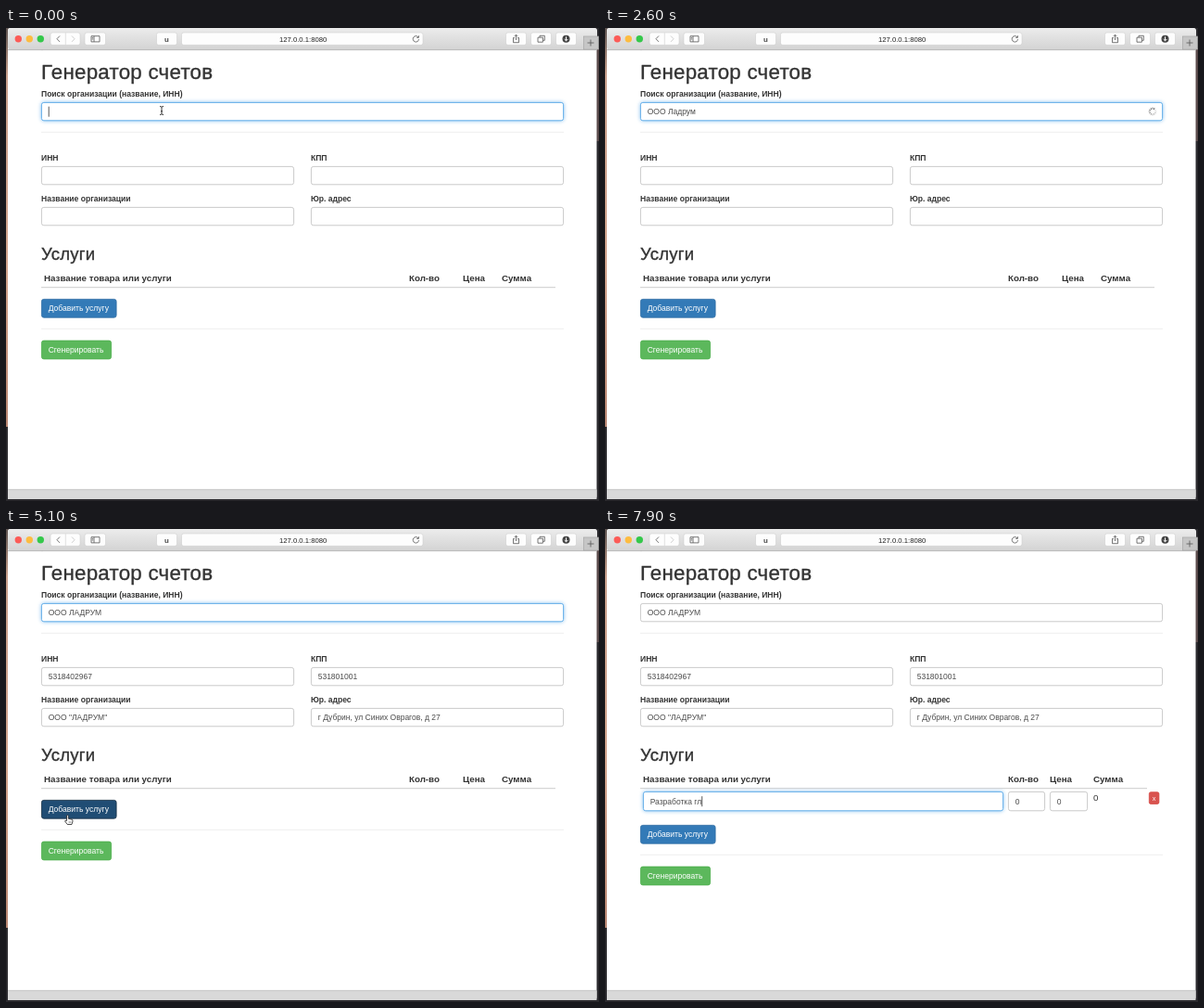
An HTML page that plays this animation: 640x510 px, repeating every 8 s.

```html
<!DOCTYPE html>
<html lang="ru">
<head>
<meta charset="utf-8">
<title>Генератор счетов</title>
<style>
html, body { margin: 0; width: 100%; height: 100%; overflow: hidden; }
svg { display: block; width: 640px; height: 510px; font-family: "Liberation Sans", Arial, sans-serif; }
text { white-space: pre; }
.title { stroke: #333; stroke-width: .35px; letter-spacing: .25px; }
.focus { stroke: #66afe9; filter: drop-shadow(0 0 2px rgba(102, 175, 233, .75)); }
.icon { fill: none; stroke: #555; stroke-width: .8; }
</style>
</head>
<body>
<svg viewBox="0 0 640 510">
  <defs>
    <linearGradient id="bar" x2="0" y2="1"><stop stop-color="#ececec"/><stop offset="1" stop-color="#d3d3d3"/></linearGradient>
    <linearGradient id="wall" x2="0" y2="1"><stop stop-color="#5d5350"/><stop offset=".12" stop-color="#c9a08c"/><stop offset=".6" stop-color="#d2a48d"/><stop offset="1" stop-color="#b98672"/></linearGradient>
  </defs>
  <g id="chrome"></g>
  <g id="page"></g>
</svg>
<script>
const LOOP = 8000;
const SHORT = 'ООО Ладрум', FULL = 'ООО ЛАДРУМ', INN = '5318402967';
const ADDRESS = 'г Дубрин, ул Синих Оврагов, д 27';
const SERVICE = 'Разработка гл';

// Blue parts of a suggestion are wrapped in asterisks.
const suggestions = [
  ['*ООО ЛАДРУМ*', INN, ADDRESS],
  ['*ООО Ладрум*', '5307619428', 'г Дубрин, ул Дымковая Б., д 34 стр 5'],
  ['*ООО ЛАДРУМ*.СЕРВИС', '5302846173', 'г Дубрин, Златокленовый пер, д 7, кв 8'],
  ['*ООО Ладрум*.Дороги', '5309274510', ADDRESS],
  ['*ООО* НКО "*Ладрум*.Монеты"', '5340016387', 'г Дубрин, ул Серого Камыша, д 18, кв 52']
];
const LIST_TOP = 115.3, ITEM = 28.75;

const searchKeys = [500, 600, 700, 800, 1000, 1100, 1200, 1300, 1400, 1500];
const serviceKeys = [6600, 6700, 6800, 7000, 7100, 7200, 7300, 7400, 7500, 7600, 7600, 7800, 7900];
const pointerPath = [
  [0, 168, 89], [2700, 168, 89], [3200, 134, 124], [3300, 134, 124], [3600, 128, 127.5],
  [3700, 128, 127.5], [4200, 185, 225], [4400, 185, 225], [5000, 67, 309],
  [5300, 67, 309], [5800, 109.5, 297], [LOOP, 109.5, 297]
];

const ctx = document.createElement('canvas').getContext('2d');
ctx.font = '8.5px "Liberation Sans", Arial, sans-serif';

const text = (x, y, s, size = 8.5, fill = '#333', extra = '') =>
  `<text x="${x}" y="${y}" font-size="${size}" fill="${fill}" ${extra}>${s}</text>`;
const bold = (x, y, s, size = 8.55) => text(x, y, s, size, '#333', 'font-weight="bold"');
const rect = (x, y, w, h, fill, r = 0, extra = '') =>
  `<rect x="${x}" y="${y}" width="${w}" height="${h}" rx="${r}" fill="${fill}" ${extra}/>`;
const path = (d, extra = 'class="icon"') => `<path d="${d}" ${extra}/>`;
const rule = (y, x2, color, width = 1) => path(`M38 ${y}H${x2}`, `stroke="${color}" stroke-width="${width}"`);

function field(x, y, w, value = '', { focus = false, caret = 0, h = 20 } = {}) {
  const base = y + h / 2 + 3.2, left = x + 7.7;
  const end = left + ctx.measureText(value).width + .5;
  return rect(x + .4, y + .4, w - .8, h - .6, '#fff', 2.4, focus ? 'class="focus"' : 'stroke="#c4c4c4" stroke-width=".9"')
    + text(left, base, value, 8.5, '#4c4c4c')
    + (caret ? path(`M${end} ${base - 8.5}v11`, `stroke="#444" stroke-width=".9" opacity="${caret}"`) : '');
}

function button(x, y, w, label, fill, stroke) {
  return rect(x + .4, y + .4, w - .8, 19.8, fill, 2.4, `stroke="${stroke}" stroke-width=".8"`)
    + text(x + 7.7, y + 13.2, label, 8.55, '#fff');
}

function chrome() {
  const pill = (x, w) => rect(x, 5, w, 13.3, '#fdfdfd', 2.2, 'stroke="#c9c9c9" stroke-width=".5"');
  const lights = ['#fc5b57', '#fdbc40', '#34c84a'].map((c, i) => `<circle cx="${13.3 + i * 12}" cy="11.8" r="3.7" fill="${c}"/>`);
  return rect(0, 0, 640, 510, '#2b2a2e') + rect(0, 0, 3, 430, 'url(#wall)')
    + rect(637, 22, 3, 100, '#5a4b4b') + rect(2, 0, 635.5, 508, '#fff', 3)
    + rect(2, 0, 636, 23.5, 'url(#bar)', 3) + rule(23.6, 637.5, '#b9b9b9') + path('M2 23.6H40', 'stroke="#b9b9b9"')
    + rect(623.5, 9, 16, 14, '#c6c6c6', 0, 'stroke="#a5a5a5" stroke-width=".7"') + path('M627.5 16h7M631 12.5v7')
    + rect(2, 498, 635.5, 10, '#d9d9d9') + path('M2 497.7H637.5', 'stroke="#b5b5b5" stroke-width=".8"')
    + lights.join('')
    + pill(48, 32) + path('M64.3 5v13.3', 'stroke="#d4d4d4" stroke-width=".7"')
    + path('M58 8.5l-3 3.2 3 3.2') + path('M71 8.5l3 3.2-3 3.2', 'class="icon" opacity=".35"')
    + pill(85, 22.5) + path('M92 8.7h9v6.2h-9zM95 8.7v6.2M92.8 10.4h1.4M92.8 12h1.4')
    + pill(162.5, 22) + text(173.5, 14.7, 'u', 7.8, '#444', 'text-anchor="middle" font-weight="bold"')
    + pill(189.5, 260.5) + text(295, 14.6, '127.0.0.1:8080', 7.7, '#222')
    + path('M444.9 9.8a3.2 3.2 0 1 0 .7 2.4M445.4 8.2v2.2h-2.2')
    + pill(539.5, 22) + path('M548.9 10.5h-1.4v5.2h6v-5.2h-1.4M550.5 13V7.3M548.7 9l1.8-1.8 1.8 1.8')
    + pill(566.5, 22) + path('M576 10V8.3h5.3v5h-1.7M574 10.2h5.4v5H574z')
    + pill(593.5, 22) + '<circle cx="604.5" cy="11.8" r="4" fill="#444"/>'
    + path('M604.5 9.3v4.4M602.6 12l1.9 1.9 1.9-1.9', 'fill="none" stroke="#fff"');
}

function spinner(t) {
  let s = '';
  for (let i = 0; i < 12; i++)
    s += `<path d="M0 -2.4V-4.4" transform="translate(591 90) rotate(${(i + t / 100) * 30})" stroke="#333" stroke-width=".9" opacity="${.15 + i * .06}"/>`;
  return s;
}

function suggestionList(y) {
  const hovered = Math.floor((y - LIST_TOP) / ITEM);
  const items = suggestions.map(([name, inn, address], i) => {
    const top = LIST_TOP + i * ITEM;
    const label = name.split('*').map((s, k) => `<tspan fill="${k % 2 ? '#248bea' : '#111'}">${s}</tspan>`).join('');
    const digits = inn.replace(/(..)(..)(.{5})(.)/, '$1<tspan dx="1.3">$2</tspan><tspan dx="1.3">$3</tspan><tspan dx="1.3">$4</tspan>');
    return (i === hovered ? rect(39, top, 562, ITEM, '#f4f4f5') : '')
      + text(41, top + 11.7, label) + text(41, top + 23.3, `${digits}  ${address}`, 8.5, '#666');
  });
  return rect(38.4, 100, 563, 159, '#fff', 0, 'stroke="#999" stroke-width=".8"')
    + text(41, 109.6, 'Выберите вариант или продолжите ввод', 7.3, '#707070') + items.join('');
}

function pointerAt(t) {
  const i = pointerPath.findIndex(p => p[0] > t);
  const [t0, x0, y0] = pointerPath[i - 1], [t1, x1, y1] = pointerPath[i];
  const k = (t - t0) / (t1 - t0), e = k * k * (3 - 2 * k);
  return [x0 + (x1 - x0) * e, y0 + (y1 - y0) * e];
}

function pointer(x, y, shape) {
  const shapes = {
    beam: path('M-2 -4.5Q0 -4.5 0 -3.5Q0 -4.5 2 -4.5M0 -3.5V3.5M-2 4.5Q0 4.5 0 3.5Q0 4.5 2 4.5M-1 .8H1', 'fill="none" stroke="#222" stroke-width=".9"'),
    arrow: path('M0 0V9.2L2.1 7.3 3.6 10.6 5.2 9.9 3.8 6.7H6.6Z', 'stroke="#fff" stroke-width=".7"'),
    hand: path('M-1.5 0Q-.5 -1.2 .3 0V3.3L4.2 4.2Q5.3 4.6 5 6L4 9.5H-.8L-3.4 6Q-3.5 4.6 -1.5 5.6Z', 'fill="#fff" stroke="#222" stroke-width=".8"')
      + path('M1.2 6.2V8M2.8 6.2V8', 'stroke="#333" stroke-width=".5"')
  };
  return `<g transform="translate(${x} ${y})">${shapes[shape]}</g>`;
}

const typed = (s, keys, t) => s.slice(0, keys.filter(k => k <= t).length);

function page(t) {
  const filled = t >= 3800, row = t >= 5300, editing = t >= 6000;
  const listOpen = t >= 2700 && !filled;
  const shift = row ? 27 : 0;
  const [x, y] = pointerAt(t);
  const pointerShown = t < 500 || (t >= 2800 && t < 6600);
  const overButton = x > 38 && x < 120 && y > 292 + shift && y < 312 + shift;
  const overField = (y > 80 && y < 100) || (row && x > 41 && x < 430 && y > 283 && y < 304);
  const pressed = overButton && t >= 5000;
  const searchCaret = t < 400 ? Math.max(0, 1 - t / 300) : +(t >= 500 && t < 1600);
  const [blue, blueEdge] = pressed ? ['#204d74', '#122b40'] : overButton ? ['#286090', '#204d74'] : ['#337ab7', '#2e6da4'];

  let s = text(38, 55, 'Генератор счетов', 22.3, '#333', 'class="title"')
    + bold(38, 74, 'Поиск организации (название, ИНН)')
    + field(38, 80, 564, filled ? FULL : typed(SHORT, searchKeys, t), { focus: !editing, caret: searchCaret })
    + rule(112.3, 602, '#eee')
    + bold(38, 143, 'ИНН') + field(38, 149, 273, filled ? INN : '')
    + bold(329, 143, 'КПП') + field(329, 149, 273, filled ? '531801001' : '')
    + bold(38, 187, 'Название организации') + field(38, 193, 273, filled ? 'ООО "ЛАДРУМ"' : '')
    + bold(329, 187, 'Юр. адрес') + field(329, 193, 273, filled ? ADDRESS : '')
    + text(38, 250.3, 'Услуги', 18.5, '#333', 'class="title"')
    + bold(41, 273.2, 'Название товара или услуги', 9.75) + bold(435, 273.2, 'Кол-во', 9.75)
    + bold(row ? 480 : 493, 273.2, 'Цена', 9.75) + bold(row ? 527 : 535, 273.2, 'Сумма', 9.75)
    + rule(279.7, row ? 585 : 593, '#d6d6d6', 1.2);

  if (row) {
    s += field(41, 283, 389, typed(SERVICE, serviceKeys, t), { focus: editing, caret: +(t >= 6600), h: 21 })
      + field(435, 283, 40, '0', { h: 21 }) + field(480, 283, 41, '0', { h: 21 })
      + text(527, 293.4, '0', 9.75)
      + rect(587.3, 283.7, 10.6, 12.8, '#d9534f', 1.8, 'stroke="#d43f3a" stroke-width=".7"')
      + text(592.6, 292.7, 'x', 7.3, '#fff', 'text-anchor="middle"');
  }
  s += button(38, 292 + shift, 81.5, 'Добавить услугу', blue, blueEdge)
    + rule(324.3 + shift, 602, '#eee')
    + button(38, 336.7 + shift, 76, 'Сгенерировать', '#5cb85c', '#4cae4c');

  if (t >= 1900 && t < 2700) s += spinner(t);
  if (listOpen) s += suggestionList(t >= 2800 ? y : 0);
  if (pointerShown) s += pointer(x, y, overButton ? 'hand' : overField ? 'beam' : 'arrow');
  return s;
}

document.getElementById('chrome').innerHTML = chrome();
const view = document.getElementById('page');
const start = performance.now();
let shown = -1;

function tick() {
  const t = Math.floor((performance.now() - start) % LOOP / 100) * 100;
  if (t !== shown) view.innerHTML = page(shown = t);
  requestAnimationFrame(tick);
}
tick();
</script>
</body>
</html>
```
